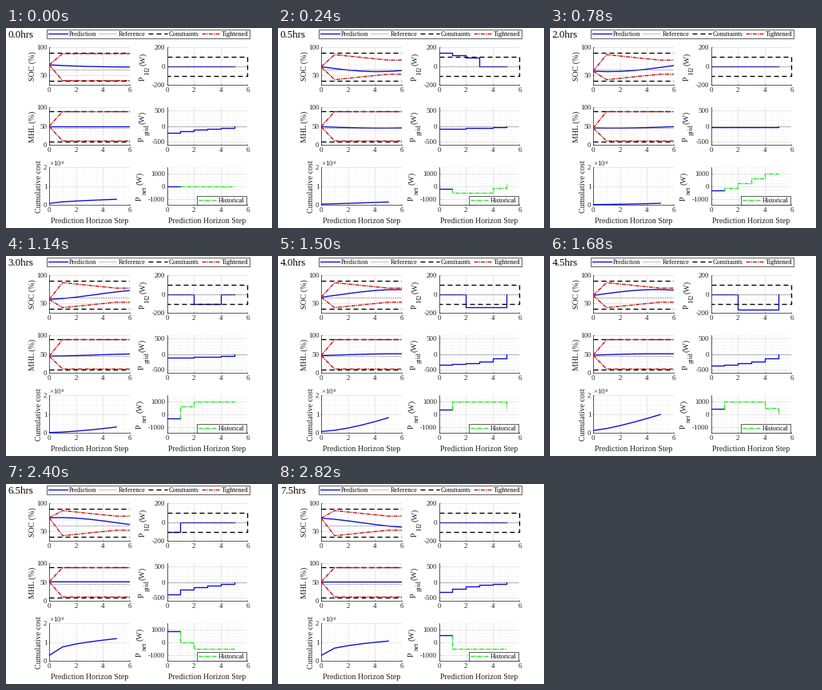
A matplotlib script for the animation above (3 s loop, 333 px wide and 250 px high).

```python
import numpy as np
import matplotlib.pyplot as plt
from matplotlib.animation import FuncAnimation
from matplotlib.patches import Rectangle
from matplotlib.ticker import MultipleLocator

W, H, DPI = 333, 250, 100
PT = 72 / DPI  # points per pixel
BLUE, RED, GREEN, GREY, INK = "#0c0cd6", "#c41414", "#20e620", "#707070", "#222222"
plt.rcParams.update({"font.family": "Liberation Serif", "lines.scale_dashes": False,
                     "axes.linewidth": 0.7 * PT})


def dashes(*lengths):
    return (0, [n * PT for n in lengths])


STYLES = {
    "Prediction": dict(color=BLUE, lw=1.35 * PT, zorder=3),
    "Reference": dict(color=GREY, lw=1.0 * PT, ls=dashes(1, 1.3), zorder=4),
    "Constraints": dict(color="black", lw=1.35 * PT, ls=dashes(6, 4), zorder=5),
    "Tightened": dict(color=RED, lw=1.4 * PT, ls=dashes(5, 1.1, 1.3, 1.1), zorder=6),
    "Historical": dict(color=GREEN, lw=1.4 * PT, ls=dashes(5, 1.1, 1.3, 1.1), zorder=6),
}
for style in STYLES.values():
    style["dash_capstyle"] = "butt"


# Model of the plant: time is counted in half-hour slots.
def soc_at(slot):
    return 66 - 9 * np.cos(2 * np.pi * (slot - 5.2) / 17)


def mhl_at(slot):
    return 48.3 - 3.2 * np.cos(np.pi * np.clip((slot - 5.5) / 8, -1, 1))


def net_history(slot):
    return np.clip(np.minimum(375 * slot - 2000, 7000 - 500 * slot), -500, 1000)


def net_now(step):
    return np.interp(step, [0, 2, 6, 8, 13, 15], [0, -400, -300, 350, 900, 550])


def bend(step):
    """Exponent that makes the forecast cost convex early and concave late."""
    return np.interp(step, [0, 2, 8, 13], [0.6, 1.5, 1.5, 0.42])


def cost_forecast(step, x):
    startup = np.exp(-step)
    rise = np.clip((step - 6) / 7, 0, 1)
    start = 0.03 + 0.27 * rise**2 * (3 - 2 * rise) + 0.06 * startup
    gain = 0.05 + 0.85 * np.exp(-((step - 11.6) / 5.3) ** 4) + 0.17 * startup
    return start + gain * (x / 5) ** bend(step)


def grid_forecast(step, x):
    start = np.interp(step, [0, 2, 6, 8, 11, 15], [-190, 50, -90, -320, -420, -310])
    return start * (1 - (x / 5) ** (1.4 * bend(step))) - 10


def h2_forecast(step, x):
    power = np.zeros(len(x))
    if 0 < step < 5:  # fuel cell covers the early deficit
        power = np.where(step + x < 4, 145 - 25 * x, 0)
    elif step < 10:  # electrolyser takes the later surplus
        power = np.where((x >= 2) & (x < (step + 1) / 2), 20 - 20 * step, 0)
    elif step > 11:
        power = np.where(step + x == 13, -100, 0)
    return power


fig = plt.figure(figsize=(W / DPI, H / DPI), dpi=DPI, facecolor="white")


def vertical_text(x, y, text, va="center", size=10):
    fig.text(x / W, 1 - y / H, text, rotation=90, ha="center", va=va,
             fontsize=size * PT, color=INK)


def power_label(x, middle, subscript):
    half = 16 + 0.8 * len(subscript)
    vertical_text(x, middle + half, "P", va="bottom")
    vertical_text(x + 6, middle + 4.5, subscript, size=8.5)
    vertical_text(x, middle - half, "(W)", va="top")


def panel(left, top, ylim, major, minor):
    ax = fig.add_axes([left / W, 1 - (top + 47) / H, 101 / W, 47 / H])
    ax.set(xlim=(0, 6), ylim=ylim)
    for axis, big, small in ((ax.xaxis, 2, 0.5), (ax.yaxis, major, minor)):
        axis.set_major_locator(MultipleLocator(big))
        axis.set_minor_locator(MultipleLocator(small))
    ax.yaxis.set_major_formatter(lambda v, _: f"{v:.0f}")
    ax.grid(True, color="#dedede", lw=0.7 * PT)
    ax.grid(True, which="minor", color="#dddddd", lw=0.6 * PT, ls=dashes(0.8, 2))
    ax.set_axisbelow(True)
    ax.tick_params(length=1.2 * PT, width=0.6 * PT, direction="in", pad=2.5 * PT,
                   labelsize=9 * PT, color=INK, labelcolor=INK)
    ax.tick_params(which="minor", length=0)
    ax.spines[["top", "right"]].set_visible(False)
    ax.spines[["left", "bottom"]].set_color(INK)
    return ax


LEFT, RIGHT = 54, 201.5
ROWS = [24.4 + 75 * row for row in range(3)]
soc_ax = panel(LEFT, ROWS[0], (33, 100), 50, 10)
mhl_ax = panel(LEFT, ROWS[1], (0, 100), 50, 10)
cost_ax = panel(LEFT, ROWS[2], (0, 2), 1, 0.25)
h2_ax = panel(RIGHT, ROWS[0], (-200, 200), 200, 50)
grid_ax = panel(RIGHT, ROWS[1], (-600, 600), 500, 100)
net_ax = panel(RIGHT, ROWS[2], (-1500, 1500), 1000, 250)

for x, top, label in zip((33, 33, 41), ROWS, ("SOC (%)", "MHL (%)", "Cumulative cost")):
    vertical_text(x, top + 23.5, label)
for x, top, subscript in zip((171.5, 170.5, 167.5), ROWS, ("H2", "grid", "net")):
    power_label(x, top + 23.5, subscript)
for center in (105, 252):
    fig.text(center / W, 1 - 241 / H, "Prediction Horizon Step", ha="center",
             va="center", fontsize=10 * PT, color=INK)
fig.text(54.5 / W, 1 - 173 / H, r"×$\mathregular{10^4}$", fontsize=9 * PT, color=INK)
clock = fig.text(2.8 / W, 1 - 12 / H, "", fontsize=13 * PT, color="black")

for ax, level in ((soc_ax, 60), (mhl_ax, 45), (h2_ax, 0), (grid_ax, 0)):
    ax.plot([0, 6], [level, level], **STYLES["Reference"])
for ax, limits in ((soc_ax, (40, 90)), (mhl_ax, (10, 90))):
    for limit in limits:
        ax.plot([0, 6], [limit, limit], **STYLES["Constraints"])
h2_ax.plot([0, 6, 6, 0], [100, 100, -100, -100], clip_on=False,
           **STYLES["Constraints"])


def line(ax, kind="Prediction", **extra):
    return ax.plot([], [], **STYLES[kind], **extra)[0]


soc_line, mhl_line, cost_line = (line(ax) for ax in (soc_ax, mhl_ax, cost_ax))
h2_line, grid_line = (line(ax, drawstyle="steps-post") for ax in (h2_ax, grid_ax))
net_line = line(net_ax)
history_line = line(net_ax, "Historical", drawstyle="steps-post")
soc_bounds = [line(soc_ax, "Tightened") for _ in range(2)]
mhl_bounds = [line(mhl_ax, "Tightened") for _ in range(2)]

# Legends are laid out in pixels, above all panels.
overlay = fig.add_axes([0, 0, 1, 1], zorder=10)
overlay.set(xlim=(0, W), ylim=(H, 0))
overlay.axis("off")


def legend(left, top, width, height, entries):
    overlay.add_patch(Rectangle((left, top), width, height, fc="white", ec=INK,
                                lw=0.7 * PT))
    middle = top + height / 2
    for x, name in entries:
        overlay.plot([x, x + 23.5], [middle, middle], **STYLES[name])
        overlay.text(x + 25.5, middle + 2.6, name, fontsize=8.3 * PT, color="black")


legend(50.5, 1.5, 254, 11, [(53, "Prediction"), (115.5, "Reference"),
                           (178, "Constraints"), (244.5, "Tightened")])
legend(238.5, 209.8, 62.5, 11.2, [(240.5, "Historical")])

SEVEN, SIX = np.arange(7), np.arange(6)


def step_at(tick):
    """Steps last three ticks; the first and the fourteenth hold one longer."""
    return max(0, (tick - 1 - (tick >= 43)) // 3)


def update(tick):
    step = step_at(tick)
    clock.set_text(f"{step / 2:.1f}hrs")

    if step:
        soc, mhl = soc_at(step + SEVEN), mhl_at(step + SEVEN)
        ahead = net_history(step + SIX[1:])
        margins, narrowing = 2.7, 9.8
    else:  # nothing recorded yet, so the forecast stays almost level
        soc, mhl = soc_at(0) - 4.5 * (1 - np.exp(-SEVEN / 3)), np.full(7, mhl_at(0))
        ahead = np.zeros(5)
        margins, narrowing = 1, 0

    soc_line.set_data(SEVEN, soc)
    mhl_line.set_data(SEVEN, mhl)
    cost_line.set_data(SIX, cost_forecast(step, SIX))
    h2_line.set_data(SIX, h2_forecast(step, SIX))
    grid_line.set_data(SIX, grid_forecast(step, SIX))

    for bound, limit, inward in zip(soc_bounds, (40, 90), (1, -1)):
        near = limit + inward * margins
        far = near + inward * narrowing
        bound.set_data([0, 1, 5, 6], [soc[0], near, far, far])
    for bound, level in zip(mhl_bounds, (11, 89)):
        bound.set_data([0, 1, 6], [mhl[0], level, level])

    net = net_now(step)
    net_line.set_data([0, 1], [net, net])
    history_line.set_data([1, *SIX[1:]], [net, *ahead])
    return ()


anim = FuncAnimation(fig, update, frames=50, interval=60, repeat=True, repeat_delay=0)
plt.show()
```
